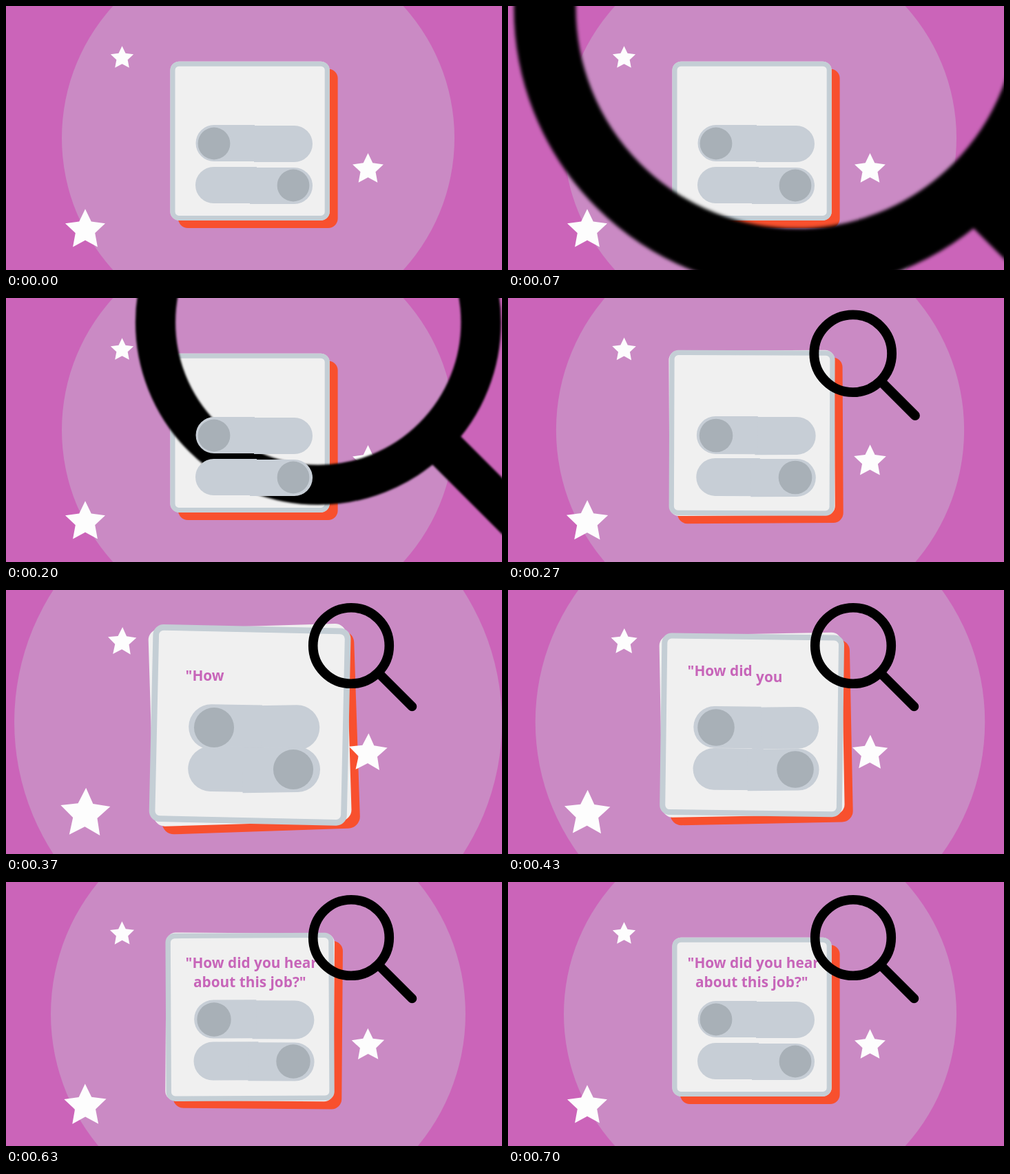
These frames come from a looping animation (720 by 384 pixels, 5010 ms). An HTML page:

```html
<!DOCTYPE html>
<html lang="en">
<head>
<meta charset="utf-8">
<title>Survey card</title>
<style>
html, body { margin: 0; width: 100%; height: 100%; overflow: hidden; background: #cb64b9; }
svg { display: block; width: 100vw; height: 100vh; }
text { font: 700 20.8px "Open Sans", "Noto Sans", sans-serif; fill: #c765b9; white-space: pre; }
</style>
</head>
<body>
<svg id="stage" viewBox="0 0 720 384">
  <defs>
    <filter id="soft" filterUnits="userSpaceOnUse" x="420" y="0" width="200" height="200">
      <feGaussianBlur stdDeviation="0.42"/>
    </filter>
  </defs>
  <rect width="720" height="384" fill="#cb64b9"/>
  <g id="scene"></g>
  <text id="line1" x="260.6" y="124.8"></text>
  <text id="line2" x="272" y="153.3"></text>
  <g id="lens" fill="none" stroke="#000" stroke-width="13.6" stroke-linecap="round" filter="url(#soft)">
    <circle cx="501" cy="81" r="55.3"/>
    <path d="M541.5 121.5L589.5 169.5"/>
  </g>
  <g id="toggles"></g>
</svg>
<script>
const LOOP = 5010, FRAME = 1000 / 30, LAST_FRAME = 21;
const LENS_START = 78, LENS_TIME = 189;
const WORD_START = 350, WORD_GAP = 38, WORD_TIME = 48;
const PEAK = 0.25;
// Time in ms and swing: the impact throws everything one way, then back.
const SWING = [[240, 0], [343, PEAK], [584, -0.091], [700, 0]];
const PILL = '#c7ced6', KNOB = '#a8b0b7';

const $ = id => document.getElementById(id);
const clamp = v => Math.min(1, Math.max(0, v));
const easeInOut = p => (1 - Math.cos(Math.PI * p)) / 2;
const parts = [];

function add(parent, tag, attrs) {
  const el = document.createElementNS('http://www.w3.org/2000/svg', tag);
  for (const key in attrs) el.setAttribute(key, attrs[key]);
  parent.appendChild(el);
  return el;
}

// A part swells around its own centre and tilts by up to `tilt` degrees.
function part(group, tag, attrs, cx, cy, tilt = 0) {
  parts.push({ el: add($(group), tag, attrs), cx, cy, tilt });
}

function circle(group, cx, cy, r, fill) {
  part(group, 'circle', { cx, cy, r, fill }, cx, cy);
}

function card(x, y, size, rx, style, tilt) {
  part('scene', 'rect', { x, y, width: size, height: size, rx, ...style },
    x + size / 2, y + size / 2, tilt);
}

function star(cx, cy, r) {
  const points = Array.from({ length: 10 }, (_, i) => {
    const a = i * Math.PI / 5, d = i % 2 ? r * 0.49 : r;
    return [cx + d * Math.sin(a), cy - d * Math.cos(a)].map(v => v.toFixed(2)).join();
  });
  part('scene', 'polygon', { points: points.join(' '), fill: '#fdfdfd' }, cx, cy, 1.8);
}

function halfPill(x1, x2, y, roundLeft) {
  const r = 26.5, h = 2 * r;
  const d = roundLeft
    ? `M${x2} ${y}H${x1 + r}a${r} ${r} 0 0 0 0 ${h}H${x2}z`
    : `M${x1} ${y}H${x2 - r}a${r} ${r} 0 0 1 0 ${h}H${x1}z`;
  part('toggles', 'path', { d, fill: PILL }, (x1 + x2) / 2, y + r, roundLeft ? 1 : -1);
}

circle('scene', 366, 192, 285, '#ca8ac4');
card(250, 91.5, 231.6, 14, { fill: '#f8502e' }, -2);
card(238.5, 80.7, 231.2, 13, { fill: '#f0f0f0' }, -1.8);
card(242, 84.2, 224.2, 9, { fill: 'none', stroke: '#c4ced5', 'stroke-width': 7 }, 1.3);
star(168.5, 75.7, 17.5);
star(525.5, 237.7, 23.6);
star(115, 325.7, 30.5);
halfPill(360, 445, 174, false);
halfPill(275.5, 361, 173, true);
halfPill(275, 364, 234, true);
halfPill(354, 445, 235, false);
circle('toggles', 302, 200, 23.4, KNOB);
circle('toggles', 417, 261, 23.4, KNOB);

const lines = [['line1', '"How did you hear'], ['line2', 'about this job?"']];
const words = lines.flatMap(([id, text]) => text.split(' ').map((word, i) => {
  const el = add($(id), 'tspan', {});
  el.textContent = (i ? ' ' : '') + word;
  return { el, first: i === 0 };
}));

function swingAt(t) {
  const next = SWING.findIndex(([time]) => time > t);
  if (next < 1) return 0;
  const [t0, a] = SWING[next - 1], [t1, b] = SWING[next];
  return a + (b - a) * easeInOut((t - t0) / (t1 - t0));
}

function render(t) {
  const swing = swingAt(t), scale = 1 + Math.abs(swing);
  for (const { el, cx, cy, tilt } of parts) {
    el.setAttribute('transform',
      `translate(${cx} ${cy}) rotate(${tilt * swing / PEAK}) scale(${scale}) translate(${-cx} ${-cy})`);
  }

  const zoom = 6.61 - 5.61 * clamp((t - LENS_START) / LENS_TIME) ** 2;
  $('lens').setAttribute('transform', `translate(515.6 94.9) scale(${zoom}) translate(-515.6 -94.9)`);
  $('lens').setAttribute('visibility', t > 60 ? 'visible' : 'hidden');

  let previous = 0;
  words.forEach(({ el, first }, i) => {
    const p = (t - WORD_START - i * WORD_GAP) / WORD_TIME;
    const drop = 11 * (1 - clamp(p));
    el.setAttribute('dy', first ? drop : drop - previous);
    el.setAttribute('visibility', p > 0 ? 'visible' : 'hidden');
    previous = drop;
  });
}

const start = performance.now();
function tick() {
  const t = (performance.now() - start) % LOOP;
  render(Math.min(LAST_FRAME, Math.floor((t + 3.4) / FRAME)) * FRAME);
  requestAnimationFrame(tick);
}
tick();
</script>
</body>
</html>
```
